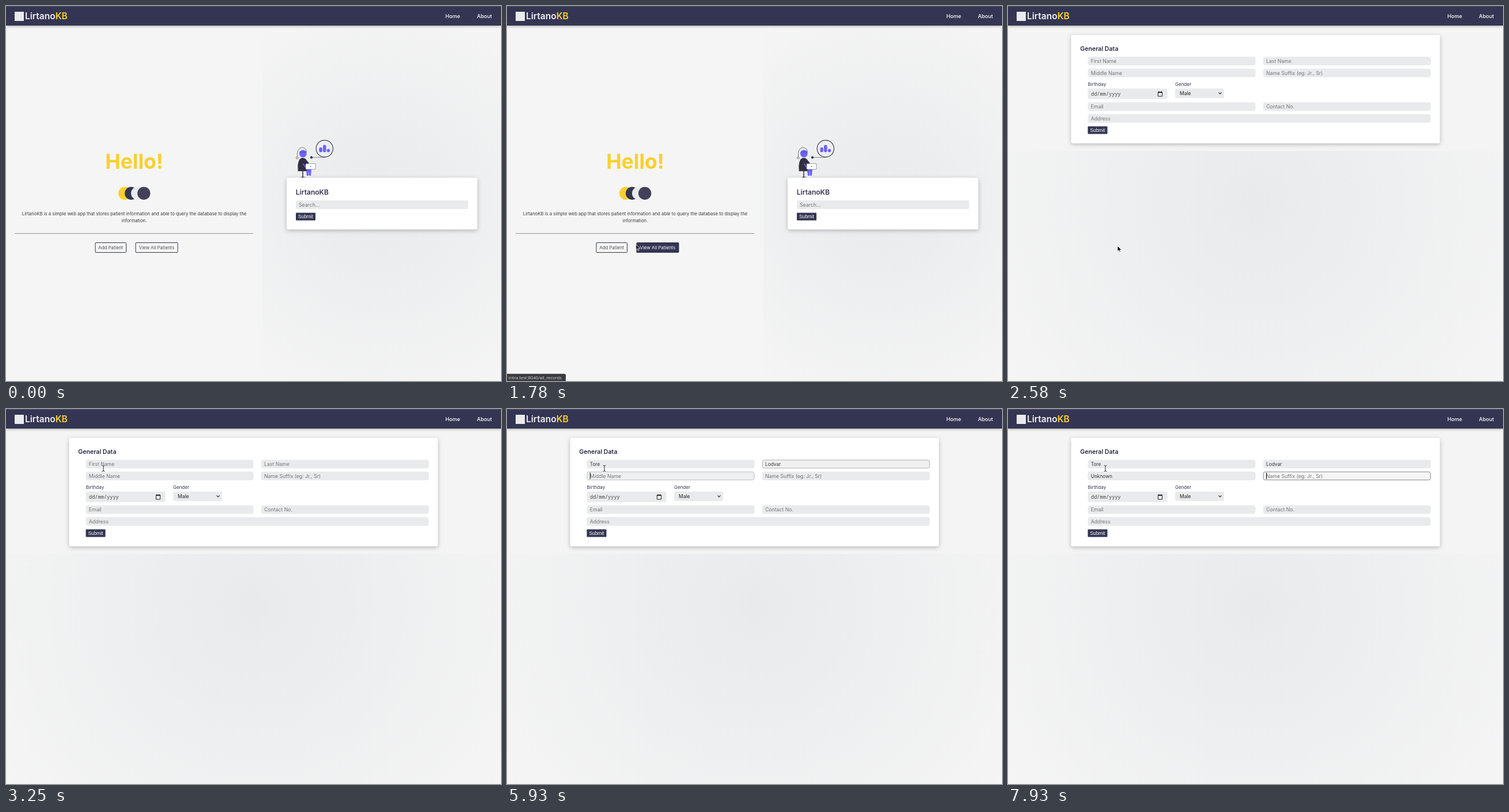
An HTML page that plays this animation: 859x652 px, repeating every 8 s.

```html
<!DOCTYPE html>
<html lang="en">
<head>
<meta charset="utf-8">
<title>Patient form</title>
<style>
html, body { margin: 0; width: 100%; height: 100%; overflow: hidden; background: #f5f5f5; }
svg { display: block; width: 859px; height: 652px; font-family: Inter, sans-serif; }
.card { fill: #fff; filter: drop-shadow(0 2.5px 3.5px rgba(0,0,0,.25)); }
.bar { filter: drop-shadow(0 1.5px 2px rgba(0,0,0,.35)); }
text { white-space: pre; }
</style>
</head>
<body>
<svg id="stage" viewBox="0 0 859 652" xmlns="http://www.w3.org/2000/svg"></svg>
<script>
const NAVY = '#333552', YELLOW = '#f9d02f', PALE = '#e9eaec', BACK = '#f5f5f5', HINT = '#757575';
const VIOLET = '#6c63ff', INK = '#2f2e41', SLATE = '#3f3d56';
const BRAND = ['Lirtano', 'KB'], LOOP = 8000;

const rect = (x, y, w, h, fill, more = '') =>
  `<rect x="${x}" y="${y}" width="${w}" height="${h}" fill="${fill}" ${more}/>`;
const text = (x, y, size, str, fill, more = '') =>
  `<text x="${x}" y="${y}" font-size="${size}" fill="${fill}" ${more}>${str}</text>`;
const circle = (x, y, r, fill, more = '') =>
  `<circle cx="${x}" cy="${y}" r="${r}" fill="${fill}" ${more}/>`;
const path = (d, fill, more = '') => `<path d="${d}" fill="${fill}" ${more}/>`;
const line = (color, width) => `stroke="${color}" stroke-width="${width}"`;
const glow = (id, x, y, r) =>
  `<radialGradient id="${id}" gradientUnits="userSpaceOnUse" cx="${x}" cy="${y}" r="${r}">
  <stop offset="0" stop-color="#e9eaec"/><stop offset="1" stop-color="${BACK}"/></radialGradient>`;

const BOLD = 'font-weight="600"', MID = 'text-anchor="middle"';

const submit = (x, y) => rect(x, y, 34, 13.4, NAVY, 'rx="1"') +
  text(x + 17, y + 9.6, 8.3, 'Submit', '#fff', MID + ' font-family="Liberation Sans, Arial, sans-serif"');

const button = (id, x, w, label) => `<g id="${id}">` +
  rect(x + .5, 411.5, w - 1, 17, BACK, 'rx="1" ' + line(NAVY, 1)) +
  text(x + w / 2, 422.8, 7.85, label, '#505050', MID) + '</g>';

const header = rect(0, 0, 859, 34, NAVY, 'class="bar"') + rect(0, 0, 859, 1, '#55566a') +
  rect(15, 10, 16, 16, PALE) +
  text(33, 23.2, 15.5, `${BRAND[0]}<tspan fill="${YELLOW}">${BRAND[1]}</tspan>`, '#f1f1f3', BOLD) +
  text(762.5, 20.7, 9.1, 'Home', '#fff', 'font-weight="500"') +
  text(817.3, 20.7, 9.1, 'About', '#fff', 'font-weight="500"');

const worker =
  circle(552.8, 248, 14.7, 'none', line(SLATE, 1.2)) +
  rect(543.4, 245.8, 5.5, 8.4, VIOLET, 'rx="2.7"') +
  rect(550, 241.4, 5.5, 12.8, VIOLET, 'rx="2.7"') +
  rect(556.8, 248.6, 5.4, 5.6, VIOLET, 'rx="2.7"') +
  path('M530 263.2H553V262.6', 'none', line(SLATE, .6)) + circle(530, 263.2, 2.2, SLATE) +
  path('M515 287V297', 'none', line(INK, 1.5)) +
  path('M510.5 298.3Q515 295.6 520 298.3Z', INK) +
  circle(515.3, 256.6, 6.4, VIOLET) +
  path('M505.6 262Q504.3 247.5 513 246Q521 246 521.4 254H509.5', 'none', line(SLATE, .7)) +
  circle(505.3, 264, 1.8, 'none', line(SLATE, .7)) +
  path('M517 283H530L529 295H526V286.5L525 295H522L521 286Z', VIOLET) +
  path('M510 266Q515 262 520 266L525.5 273L521 287H507Q505 273 510 266Z', INK) +
  path('M515.5 273.5L521 279.5L519.5 281.5L515 275Z', VIOLET) +
  path('M506.5 286.5H522', 'none', line(INK, 1.4)) +
  rect(520, 274, 17, 10, '#fff', 'rx=".8" ' + line(SLATE, .5)) + circle(528.6, 279, .9, VIOLET);

const home = `<g id="home">` + rect(0, 0, 859, 652, BACK) + rect(445, 34, 414, 618, 'url(#glowA)') +
  text(222.5, 283, 35.5, 'Hello!', YELLOW, MID + ' font-weight="700"') +
  [YELLOW, NAVY, PALE, '#43405a'].map((c, i) => circle(206.2 + 11 * i, 325.7, 11.2, c)).join('') +
  text(222.5, 363.8, 7.75, BRAND.join('') + ' is a simple web app that stores patient information ' +
    'and able to query the database to display the', '#3c3c3c', MID) +
  text(222.5, 375.8, 7.75, 'information.', '#3c3c3c', MID) +
  rect(15, 395, 414, 1, '#959597') +
  button('add', 154.5, 54.5, 'Add Patient') + button('view', 224.5, 74, 'View All Patients') +
  worker + rect(487, 298.5, 331, 90, '#fff', 'rx="3" class="card"') +
  text(502.8, 328, 12, BRAND.join(''), NAVY, BOLD) +
  rect(503, 338, 299, 15, PALE, 'rx="3"') + text(508, 348.6, 8.7, 'Search...', HINT) +
  submit(503, 359.4) + '</g>';

// Text fields: x, y, width, hint
const FIELDS = [
  [138.5, 88.3, 291, 'First Name'], [442.7, 88.3, 291, 'Last Name'],
  [138.5, 108.8, 291, 'Middle Name'], [442.7, 108.8, 291, 'Name Suffix (eg: Jr., Sr)'],
  [138.5, 167.5, 291, 'Email'], [442.7, 167.5, 291, 'Contact No.'],
  [138.5, 188.1, 595, 'Address']
];
const field = ([x, y, w, hint], i) => `<g id="field${i}">` +
  rect(x + .5, y + .5, w - 1, 14, PALE, 'rx="3" ' + line(PALE, 1)) +
  text(x + 5.3, y + 10.7, 8.7, hint, HINT) + '</g>';

const form = `<g id="form">` + rect(0, 0, 859, 652, 'url(#glowB)') + rect(0, 34, 859, 218, '#f4f4f4') +
  rect(109.5, 50.3, 640, 188.5, '#fff', 'rx="3" class="card"') +
  text(125.3, 78, 10.6, 'General Data', '#26283f', BOLD) +
  FIELDS.map(field).join('') +
  text(138.6, 139.3, 8.05, 'Birthday', NAVY) + text(290, 139.3, 8, 'Gender', NAVY) +
  rect(138.5, 143.5, 138, 18.3, PALE, 'rx="3"') +
  text(144, 156, 8.65, 'dd/mm/yyyy', '#444', 'font-family="Noto Sans Mono, monospace"') +
  path('M260.4 149.6H267.6V157H260.4ZM260 150.4H268M262 148V150M266 148V150', 'none', line('#222', 1)) +
  rect(290, 143.5, 85, 16.5, PALE, 'rx="3"') + text(298, 154.6, 8.5, 'Male', '#222') +
  path('M365.5 150.4L368 153L370.5 150.4', 'none', line('#222', 1.2)) +
  submit(138.5, 209.2) + rect(0, 0, 1, 11, '#111', 'id="caret"') + '</g>';

const status = `<g id="status">` + path('M0 639.5H99Q102 639.5 102 642.5V652H0Z', '#3a3b3e') +
  text(2.8, 649, 7.6, '', '#dcdde0', 'font-family="Open Sans, sans-serif"') + '</g>';

const cursors = `<g id="cursor" stroke-linejoin="round">` +
  path('M0 0V9.6L2.3 7.6L3.8 11L5.4 10.3L4 7H7Z', '#111', 'id="arrow" ' + line('#fff', .8)) +
  path('M-1.2 1a1.1 1.1 0 0 1 2.2 0V4.5l1.7.3 1.8.5 1.6.7Q7 6.6 6.6 8.5L5.6 12H0L-3.4 8Q-4 6.6-2.8 6.5L-1.2 7.6Z' +
    'M2.7 4.8V7M4.5 5.3V7.2', '#fff', 'id="hand" ' + line('#222', .9)) +
  `<g id="beam">` + ['#fff 2.4', '#222 1'].map(s => path('M-2.4-5Q0-5 0-3.6Q0-5 2.4-5M0-4V4.4M-2.4 5.4Q0 5.4 0 4Q0 5.4 2.4 5.4',
    'none', line(...s.split(' ')))).join('') + '</g></g>';

const stage = document.getElementById('stage');
stage.innerHTML = '<defs>' + glow('glowA', 652, 343, 372) + glow('glowB', 430, 343, 530) + '</defs>' +
  home + form + header + status + cursors;
const el = id => document.getElementById(id);
const show = (node, on) => node.setAttribute('display', on ? 'inline' : 'none');
const ramp = (t, from, len) => Math.min(1, Math.max(0, (t - from) / len));
const mix = (a, b, k) => {
  const ch = (c, i) => parseInt(c.substr(1 + 2 * i, 2), 16);
  return `rgb(${[0, 1, 2].map(i => Math.round(ch(a, i) + (ch(b, i) - ch(a, i)) * k)).join()})`;
};

// Pointer stops: time, x, y
const MOVES = [
  [460, 830, 292], [1250, 234, 411.5], [1320, 241, 412], [1560, 241, 413],
  [2120, 190, 417], [2580, 190, 417], [3250, 169, 103], [LOOP, 169, 103]
];
function pointer(t) {
  const i = Math.max(1, MOVES.findIndex(m => m[0] > t));
  const [t0, x0, y0] = MOVES[i - 1], [t1, x1, y1] = MOVES[i];
  const k = (1 - Math.cos(Math.PI * ramp(t, t0, t1 - t0))) / 2;
  return [x0 + (x1 - x0) * k, y0 + (y1 - y0) * k];
}

const inside = (x, y, l, t, w, h) => x >= l && x <= l + w && y >= t && y <= t + h;
function shape(t, x, y) {
  if (t < 2320) {
    if (t >= 2180) return 'arrow';
    if (inside(x, y, 503, 338, 299, 15)) return 'beam';
    return inside(x, y, 154, 411, 55, 18) || inside(x, y, 224, 411, 74, 18) ? 'hand' : 'arrow';
  }
  return t >= 3250 || FIELDS.some(f => inside(x, y, f[0], f[1], f[2], 15)) ? 'beam' : 'arrow';
}

function hover(id, t, from, to) {
  const k = ramp(t, from, 200) - ramp(t, to, 200), [box, label] = el(id).children;
  box.setAttribute('fill', mix(BACK, NAVY, k));
  label.setAttribute('fill', mix('#505050', '#ffffff', k));
}

// Typing: focus start, focus end, word, time of each letter
const TYPING = [
  [3450, 4030, 'Tore', [3520, 3520, 3650, 3790]],
  [4030, 5830, 'Lodvar', [4470, 4670, 5200, 5330, 5460, 5600]],
  [5830, 7700, 'Unknown', [6600, 6800, 7000, 7000, 7130, 7270, 7400]],
  [7700, LOOP + 500, '', []]
];
function type(t) {
  const caret = el('caret');
  show(caret, false);
  TYPING.forEach(([from, to, word, keys], i) => {
    const [x, y, , hint] = FIELDS[i], [box, label] = el('field' + i).children;
    const k = ramp(t, from, 240) - ramp(t, to, 240);
    box.setAttribute('fill', mix(PALE, BACK, k));
    box.setAttribute('stroke', mix(PALE, '#85858a', k));
    const done = keys.filter(key => key <= t), value = word.slice(0, done.length);
    label.textContent = value || hint;
    label.setAttribute('font-size', value ? 8.3 : 8.7);
    label.setAttribute('fill', value ? '#333333' : HINT);
    if (t < from || t >= to) return;
    const last = done.length ? done[done.length - 1] : from;
    caret.setAttribute('x', x + 5.3 + (value ? label.getComputedTextLength() : 0));
    caret.setAttribute('y', y + 2);
    show(caret, (t - last) % 1060 <= 530);
  });
}

function draw(t) {
  const onForm = t >= 2320;
  show(el('home'), !onForm);
  show(el('form'), onForm);
  if (onForm) type(t);
  else {
    hover('view', t, 1250, 1800);
    hover('add', t, 1930, LOOP);
  }
  const page = t >= 1520 && t < 1860 ? 'all_records' : t >= 1980 && t < 2580 ? 'add_record' : '';
  show(el('status'), page);
  el('status').lastChild.textContent = 'intra.test:8040/' + page;
  const [x, y] = pointer(t), kind = shape(t, x, y);
  show(el('cursor'), t >= 460);
  el('cursor').setAttribute('transform', `translate(${x.toFixed(2)} ${y.toFixed(2)})`);
  for (const id of ['arrow', 'hand', 'beam']) show(el(id), id === kind);
}

const start = performance.now();
function tick() {
  draw((performance.now() - start) % LOOP);
  requestAnimationFrame(tick);
}
tick();
</script>
</body>
</html>
```
